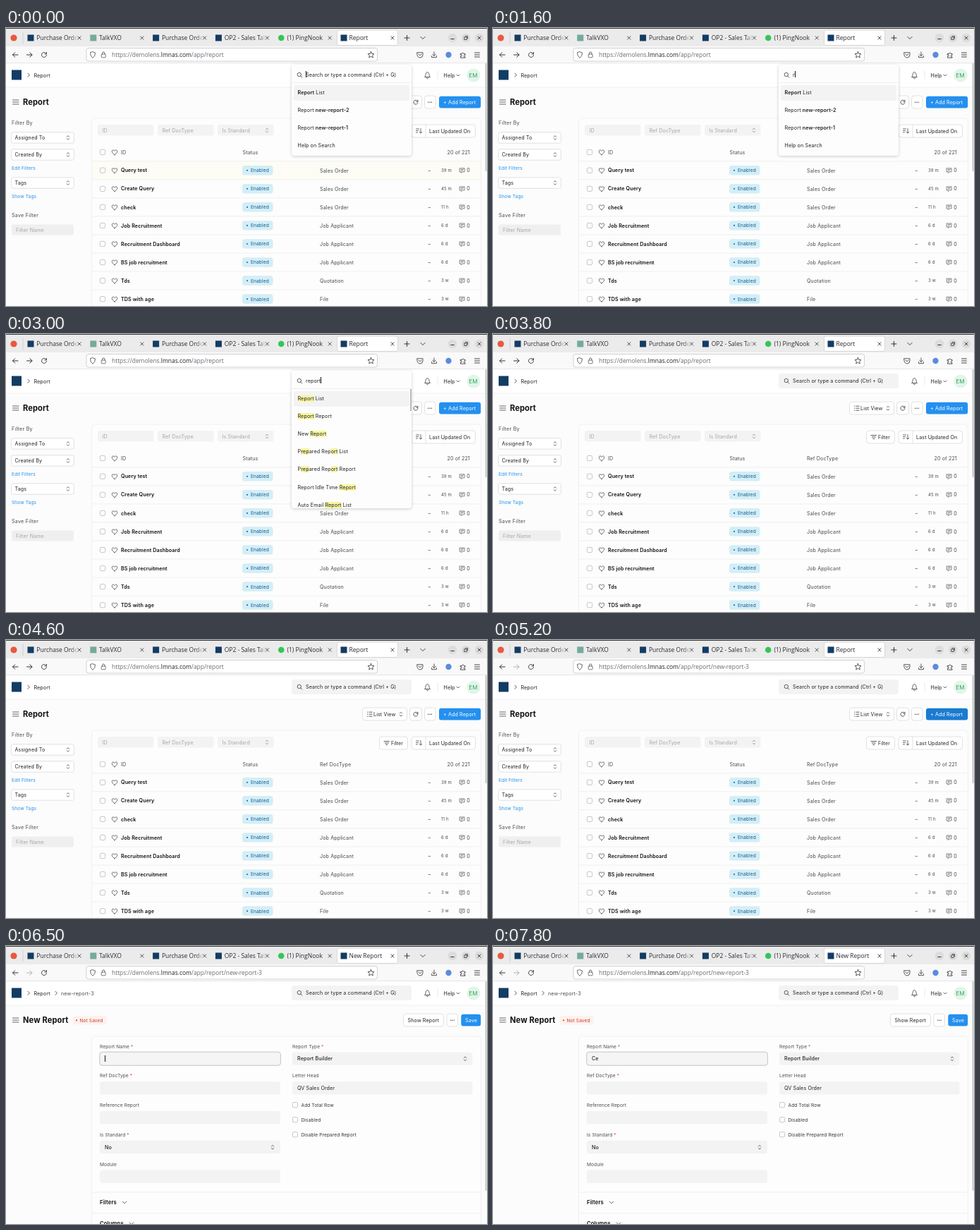
An HTML page that plays this animation: 682 px wide and 394 px high, repeating every 8 s.

```html
<!DOCTYPE html>
<html lang="en">
<head>
<meta charset="utf-8">
<title>Report</title>
<style>
  html, body { margin: 0; width: 100%; height: 100%; overflow: hidden; background: #fbfcfb; }
  #stage { position: relative; width: 682px; height: 394px; overflow: hidden; }
  #stage > svg { position: absolute; left: 0; top: 0; }
  #stage { font-family: Inter, sans-serif; }
  text { white-space: pre; letter-spacing: .015em; }
  .ui { font-family: "Open Sans", "Noto Sans", sans-serif; letter-spacing: 0; }
  #panel, #search, #name { position: absolute; font-size: 7.15px; letter-spacing: .015em; color: #222; white-space: pre; }
  #panel { left: 405px; top: 52px; width: 170px; background: #fdfdfd; border-radius: 4px;
    box-shadow: 0 1px 4px rgba(0, 0, 0, .2); overflow: hidden; }
  #panel::before { content: ""; position: absolute; left: 0; right: 0; top: 25px; height: 1px; background: #f0f0f0; }
  #panel div { position: absolute; left: 3px; width: 164px; height: 22px; line-height: 22px;
    text-indent: 5.5px; border-radius: 3px; }
  #panel div:first-child { background: #f3f3f3; }
  #panel i { position: absolute; right: 0; top: 26px; width: 2px; background: #bcbcbc; }
  #panel b { font-weight: 600; }
  mark { background: #f7f5a0; color: inherit; }
  #search { left: 425px; top: 56.5px; line-height: 20px; }
  #name { left: 140px; top: 150px; line-height: 19px; font-weight: 500; }
  .caret { display: inline-block; height: 9px; border-left: 1px solid #111; margin-right: -1px; vertical-align: -1.8px; }
</style>
</head>
<body>
<div id="stage"></div>
<script>
const LOOP = 8000;
const INK = '#222', MUTED = '#484d51', BLUE = '#2490ef', FILL = '#f3f3f3', EDGE = '#d9dbdc', NAVY = '#123c63';

// Drawing helpers; text is placed by its left edge and the middle of its capitals.
const text = (x, y, s, size = 7.15, weight = 400, fill = INK, attrs = '') =>
  `<text x="${x}" y="${y + size * .364}" font-size="${size}" font-weight="${weight}" fill="${fill}" ${attrs}>${s}</text>`;
const rect = (x, y, w, h, fill, r = 3, stroke = 'none') =>
  `<rect x="${x}" y="${y}" width="${w}" height="${h}" rx="${r}" fill="${fill}" stroke="${stroke}" stroke-width=".8"/>`;
const line = (d, stroke = '#444', w = 1, attrs = '') =>
  `<path d="${d}" fill="none" stroke="${stroke}" stroke-width="${w}" stroke-linecap="round" stroke-linejoin="round" ${attrs}/>`;
const dot = (x, y, r, fill) => `<circle cx="${x}" cy="${y}" r="${r}" fill="${fill}"/>`;
const ring = (x, y, r, stroke = '#444', w = 1) =>
  `<circle cx="${x}" cy="${y}" r="${r}" fill="none" stroke="${stroke}" stroke-width="${w}"/>`;
const ui = (x, y, s, size, fill = '#2b2b33') => text(x, y, s, size, 400, fill, 'class="ui"');
const cross = (x, y, r = 2.2, c = '#444') => line(`M${x - r} ${y - r}l${2 * r} ${2 * r}m0 ${-2 * r}l${-2 * r} ${2 * r}`, c, .9);
const down = (x, y, r = 2.4, c = '#555') => line(`M${x - r} ${y - r / 2}l${r} ${r}l${r} ${-r}`, c, .9);
const updown = (x, y, c = '#444') => line(`M${x - 1.6} ${y - 1.2}l1.6 -1.7l1.6 1.7m0 2.4l-1.6 1.7l-1.6 -1.7`, c, .8);
const bars = (x, y, w, c = '#555') => line([-3, 0, 3].map(d => `M${x} ${y + d}h${w}`).join(''), c, .9);
const more = x => [-2.3, 0, 2.3].map(d => dot(x + d, 105.3, .7, '#444')).join('');
const reload = (x, y, r, c) =>
  line(`M${x + r * .8} ${y - r * .6}A${r} ${r} 0 1 0 ${x + r} ${y + .4}M${x + r} ${y - r}v${r * .7}h${-r * .7}`, c, .9);
const heart = (x, y) =>
  line(`M${x} ${y + 3.4}C${x - 7} ${y - 1} ${x - 2.6} ${y - 5.6} ${x} ${y - 2}C${x + 2.6} ${y - 5.6} ${x + 7} ${y - 1} ${x} ${y + 3.4}z`, '#444', .8);
const box = (x, y) => rect(x - 3.6, y - 3.6, 7.2, 7.2, '#fff', 1.8, '#b4b8ba');
const button = (x, w, y = 96) => rect(x, y, w, 18, '#fff', 3.5, EDGE);
const scrollbar = h => rect(679.7, 50, 1.7, h, '#bdbdbf', .8);
const title = s => text(24, 105, s, 11.1, 700, '#111', 'style="letter-spacing:.01em"');

function browser() {
  const tabs = ['Purchase Order', 'TalkVXO', 'Purchase Order', 'OP2 - Sales Table', '(1) PingNook', ''];
  let s = rect(0, 0, 682, 27, '#ebebeb', 0) + rect(0, 26, 682, 24, '#f9f9fa', 0) + rect(0, 0, 682, 1, '#3a3a3a', 0)
    + line('M24 6v16', '#c9c9cc', .8) + dot(11, 14, 4.6, '#e9583f')
    + rect(469.5, 3, 86, 21.5, '#fff', 2.5, '#d2d2d6');
  tabs.forEach((name, i) => {
    const x = 35 + 88.8 * i;
    s += i === 1 ? rect(x - 4.5, 9.5, 9, 9, '#74aa9c', 0)
      : i === 4 ? dot(x, 14, 4.3, '#32c759') : rect(x - 4.5, 9.5, 9, 9, NAVY, 0);
    s += `<svg x="${x + 7}" width="62" height="27">${ui(1.3, 14, name, 8.5)}</svg>`;
    if (name.length > 12) s += rect(x + 57, 6, 12, 16, 'url(#fade)', 0);
    s += cross(x + 69, 14);
  });
  s += line('M565 14h7m-3.5 -3.5v7', '#333') + down(591, 14, 3.2, '#333');
  for (const x of [633, 652, 671]) s += dot(x, 14, 6.2, '#dcdcdd');
  s += line('M630.8 15.5h4.4', '#333') + cross(671, 14, 2, '#333')
    + rect(649.8, 13, 3.4, 3.4, 'none', 0, '#333') + line('M651.3 11.6h3.2v3.2', '#333', .8);
  s += line('M17 38h-7.5m3.2 -3.2l-3.2 3.2l3.2 3.2', '#333')
    + line('M29.5 38h7.5m-3.2 -3.2l3.2 3.2l-3.2 3.2', '#333', 1, 'id="next"') + reload(54, 38, 3.5, '#333')
    + rect(114, 28.5, 412.5, 18.5, '#fff', 3, '#c6c6cb')
    + line('M123 33.8l3.5 1.2q.2 5 -3.5 7.4q-3.7 -2.4 -3.5 -7.4z', '#555', .9)
    + rect(135.2, 37, 6, 4.8, 'none', 1, '#555') + line('M136.5 37v-1.3a1.7 1.7 0 0 1 3.4 0v1.3', '#555', .9)
    + line('M517.5 33.5l1.3 2.9 3.2 .3 -2.4 2.1 .7 3.1 -2.8 -1.6 -2.8 1.6 .7 -3.1 -2.4 -2.1 3.2 -.3z', '#444', .9)
    + `<text class="ui" x="150" y="41" font-size="8.43" fill="#6c6c72">https://demolens.<tspan fill="#222">lmnas.com</tspan><tspan id="path"></tspan></text>`
    + line('M583 34.8h8v3.2a4 4 0 0 1 -8 0zm2 2.2l2 2l2 -2', '#444', .9)
    + line('M607 34v5.4m-2.4 -2.2l2.4 2.4l2.4 -2.4M603.6 39.5v2.2h6.8v-2.2', '#444', .9)
    + dot(627.5, 38, 4.2, '#5a8be0')
    + line('M644.5 36.5h2a1.3 1.3 0 1 1 2.6 0h2v2a1.3 1.3 0 1 0 0 2.4v1.3h-6.6v-2a1.2 1.2 0 1 0 0 -2.2z', '#444', .9)
    + bars(664.5, 38, 7, '#333');
  return s;
}

function navbar() {
  return rect(0, 49.6, 682, 34.4, '#fff', 0) + line('M0 49.6H682', '#dcdce0', .7) + line('M0 84H682', '#ededed', .8)
    + rect(8, 59.5, 14, 14, NAVY, 0) + line('M31 64.3l2.4 2.5l-2.4 2.5', '#444', .9) + text(39.5, 67, 'Report')
    + rect(405, 56, 170, 21, FILL, 4)
    + line('M594 69.3c1.6 -1.4 .3 -6.6 3.5 -6.6s1.9 5.2 3.5 6.6zm2.5 1.5a1 1 0 0 0 2 0', '#444', .9)
    + line('M612 61v11', '#e2e2e2', .8)
    + text(620.5, 67, 'Help') + down(641, 67, 2) + dot(663, 67, 9.6, '#e1f5e8') + text(656.3, 67, 'EM', 8.1, 400, '#37a361')
    + bars(9.5, 105, 8.5);
}

function listView() {
  let s = title('Report')
    + button(505.5, 63) + bars(515, 105.2, 4, '#444') + [-3, 0, 3].map(d => dot(512.8, 105.2 + d, .6, '#444')).join('')
    + text(521, 105.2, 'List View') + updown(560, 105.2)
    + button(572.5, 17) + reload(581, 105.2, 3, '#444') + button(593.5, 15.5) + more(601)
    + `<rect id="add" x="614" y="96.7" width="59.2" height="16.8" rx="3.3"/>`
    + text(620, 105.2, '+ Add Report', 7.15, 400, '#fff');
  for (const [label, y] of [['Filter By', 134.5], ['Save Filter', 265.5]])
    s += text(8, y, label, 7.15, 400, MUTED, 'style="letter-spacing:.25px"');
  for (const [label, y] of [['Assigned To', 155.5], ['Created By', 179.5], ['Tags', 219.5]])
    s += rect(7.6, y - 7.7, 88.8, 15.4, '#fff', 2.5, EDGE) + text(12.5, y, label) + updown(88, y);
  s += text(8, 198.5, 'Edit Filters', 6.6, 400, BLUE) + text(8, 238.5, 'Show Tags', 6.6, 400, BLUE)
    + rect(8, 278.5, 88, 15, '#efefef', 2.5) + text(14, 286.3, 'Filter Name', 7.15, 400, '#a4a8aa')
    + rect(121.5, 128, 552, 290, '#fcfdfc', 5, '#ececec');
  ['ID', 'Ref DocType', 'Is Standard'].forEach((label, i) =>
    s += rect(130 + 85 * i, 137, 79.5, 15.5, FILL, 3) + text(136.5 + 85 * i, 145, label, 7.15, 400, '#a2a7aa'));
  s += updown(370, 145, '#888')
    + button(529.5, 40, 137) + line('M536 143.6h7.5m-6.2 2.4h5m-3.6 2.4h2.2', '#444', .9) + text(546, 146, 'Filter', 6.9)
    + button(575, 90.5, 137) + line('M595 137v18', EDGE, .8)
    + line('M581.5 143h4m-4 2.5h3m-3 2.5h2M588 142.5v6.5m-1.7 -1.7l1.7 1.7l1.7 -1.7', '#444', .8) + text(600, 146, 'Last Updated On')
    + box(137, 176) + heart(154, 176.3);
  for (const [x, label] of [[163, 'ID'], [335.5, 'Status'], [445, 'Ref DocType'], [625.5, '20 of 221']])
    s += text(x, 176.3, label, 7.15, 400, '#484c4f');
  s += `<rect id="hover" x="122" y="189" width="551" height="26" fill="#fdfcf5"/>`;
  const rows = [['Query test', 'Sales Order', '39 m'], ['Create Query', 'Sales Order', '45 m'], ['check', 'Sales Order', '11 h'],
    ['Job Recruitment', 'Job Applicant', '6 d'], ['Recruitment Dashboard', 'Job Applicant', '6 d'],
    ['BS job recruitment', 'Job Applicant', '6 d'], ['Tds', 'Quotation', '3 w'], ['TDS with age', 'File', '3 w']];
  rows.forEach(([name, type, age], i) => {
    const y = 201.8 + 26.05 * i;
    s += line(`M122 ${y - 13}H673`, '#ededed', .8) + box(137, y) + heart(154, y + .3) + text(163, y, name, 7.15, 600, '#111')
      + rect(335, y - 6.8, 43.5, 13.4, '#d3eef6', 3.5) + dot(342, y, 1.1, '#1579b8') + text(347, y, 'Enabled', 6.6, 400, '#125a96')
      + text(445, y + .7, type, 7.15, 400, '#454a4d') + line(`M599 ${y + .5}h2.6`, '#666', .8) + text(617, y, age, 6.1, 400, MUTED)
      + line(`M643.5 ${y - 3}h6.6v5h-3l-1.8 1.7v-1.7h-1.8zm1.6 1.6h3.4m-3.4 1.7h2.2`, '#555', .7)
      + text(653.3, y, '0', 7.15, 400, '#444');
  });
  return s + scrollbar(153);
}

function formView() {
  let s = line('M70 64.3l2.4 2.5l-2.4 2.5', '#444', .9) + text(78, 67, 'new-report-3', 7.15, 400, MUTED)
    + title('New Report')
    + rect(94.5, 99, 48.5, 12.5, '#fdf1ee', 4) + dot(100, 105.3, 1.1, '#d8432f') + text(104.5, 105.3, 'Not Saved', 6.6, 400, '#c93c2b')
    + button(563.5, 57) + text(569.5, 105.2, 'Show Report') + button(625, 15.5) + more(632.8)
    + rect(645.3, 96.7, 27.9, 16.8, BLUE, 3.3) + text(651, 105.2, 'Save', 7.15, 400, '#fff')
    + rect(121.5, 128, 552, 290, '#fdfdfd', 5, '#ececec');
  const fields = [['Report Name', 1], ['Ref DocType', 1], ['Reference Report', 0], ['Is Standard', 1], ['Module', 0]];
  const label = (x, y, name, must) => text(x, y, name + (must ? ' <tspan fill="#e0443a">*</tspan>' : ''), 6.6, 400, MUTED);
  fields.forEach(([name, must], i) => {
    const y = 142.2 + 41.8 * i;
    s += label(133, y, name, must)
      + (i ? rect(133, y + 8.2, 256, 18.4, FILL, 3.5) : rect(132.8, y + 8, 256.6, 19, '#f5f5f5', 3.5, '#b3b6b8'));
  });
  s += text(140, 285, 'No', 7.15, 500) + updown(378, 285.2);
  [['Report Type', 'Report Builder', 500], ['Letter Head', 'QV Sales Order', 400]].forEach(([name, value, weight], i) => {
    const y = 142.2 + 41.8 * i;
    s += label(406, y, name, !i) + rect(406, y + 8.2, 255.5, 18.4, FILL, 3.5) + text(413, y + 17.5, value, 7.15, weight);
  });
  s += updown(651, 159.8);
  ['Add Total Row', 'Disabled', 'Disable Prepared Report'].forEach((name, i) =>
    s += box(410, 225.2 + 21 * i) + text(418.5, 225.2 + 21 * i, name, 6.6, 400, '#333'));
  [['Filters', 168], ['Columns', 178]].forEach(([name, x], i) => {
    const y = 363 + 29.8 * i;
    s += line(`M122 ${y - 14}H673`, '#ededed', .8) + text(133, y, name, 7.7, 600, '#111') + down(x, y + .5, 2.8);
  });
  return s + scrollbar(297);
}

document.getElementById('stage').innerHTML = `<svg width="682" height="394">
  <defs><linearGradient id="fade"><stop stop-color="#ebebeb" stop-opacity="0"/><stop offset=".8" stop-color="#ebebeb"/></linearGradient></defs>
  ${browser()}<text id="tab" class="ui" x="486.5" y="17.1" font-size="8.5" fill="#2b2b33"></text>
  ${navbar()}<g id="list">${listView()}</g><g id="form">${formView()}</g></svg>
  <div id="panel"></div>
  <svg width="682" height="394">${ring(415.8, 66, 2.7, '#444', .85) + line('M417.8 68l2 2.1', '#444', .85)}</svg>
  <div id="search"></div><div id="name"></div>`;

const $ = id => document.getElementById(id);
const show = (id, on) => { $(id).style.display = on ? '' : 'none'; };
const put = (id, html) => { const e = $(id); if (e.shown !== html) e.innerHTML = e.shown = html; };
const CARET = '<span class="caret"></span>';
const keys = [1600, 1900, 2100, 2300, 2500, 2700];
const recent = ['<b>Report</b> List', 'Report <b>new-report-2</b>', 'Report <b>new-report-1</b>', 'Help on Search'];
// Each hit: title, where the match starts, and where it resumes after three letters.
const hits = [['Report List', 0], ['Report Report', 0], ['New Report', 4], ['Prepared Report List', 1, 12],
  ['Prepared Report Report', 1, 12], ['Report Idle Time Report', 17], ['Auto Email Report List', 11]];

function highlight([title, start, resume = start + 3], n) {
  return [...title].map((c, i) =>
    (i >= start && i < start + Math.min(n, 3)) || (i >= resume && i < resume + n - 3) ? `<mark>${c}</mark>` : c).join('');
}

function render(t) {
  const open = t < 3400, form = t >= 5400, routed = t >= 5200;
  const n = keys.filter(k => t >= k).length;
  const found = n > 1;
  show('list', !form);
  show('form', form);
  show('hover', t < 500);
  show('panel', open);
  $('add').setAttribute('fill', t >= 5000 ? '#1a7bd0' : BLUE);
  $('next').setAttribute('stroke', routed ? '#b0b0b6' : '#333');
  put('path', '/app/report' + (routed ? '/new-report-3' : ''));
  put('tab', form ? 'New Report' : 'Report');

  const items = found ? hits.map(h => highlight(h, n)) : recent;
  $('panel').style.height = (found ? 195 : 129) + 'px';
  put('panel', items.map((s, i) => `<div style="top:${28.5 + 25.2 * i}px">${s}</div>`).join('')
    + (found ? `<i style="height:${n > 5 ? 31 : 22}px"></i>` : ''));
  const hint = 'Search or type a command (Ctrl + G)';
  put('search', !open ? hint : n ? 'report'.slice(0, n) + CARET : CARET + hint);

  const blink = t < 6000 || (t >= 6500 && t < 7200);
  put('name', !form ? '' : t >= 7400 ? 'Ce' : t >= 7200 ? 'C' : blink ? CARET : '');
}

const begin = performance.now();
(function tick() {
  render((performance.now() - begin) % LOOP);
  requestAnimationFrame(tick);
})();
</script>
</body>
</html>
```
